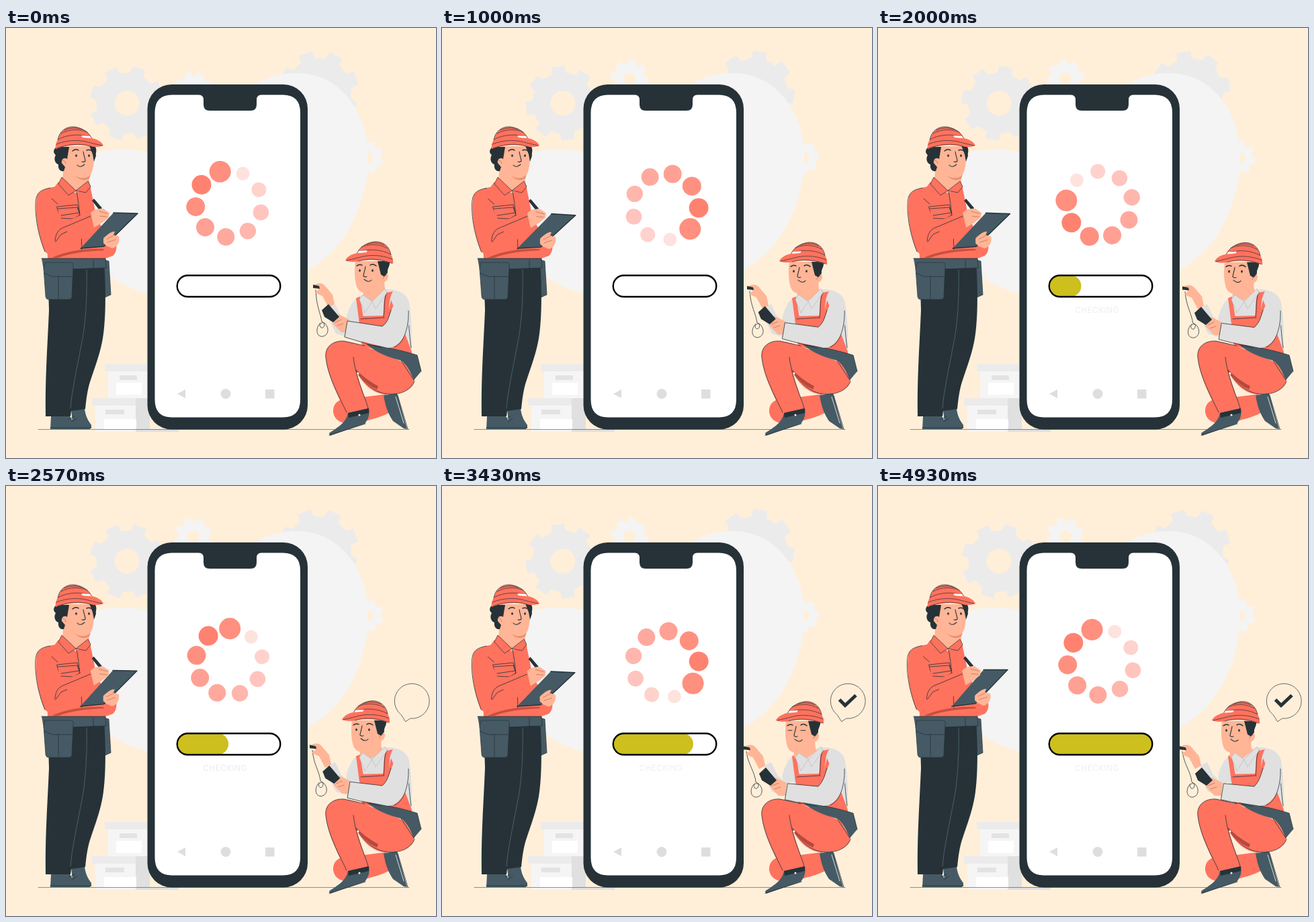
Write an HTML page that moves like this. It is 640 px wide and 640 px high and loops after 5000 ms.

```html
<!DOCTYPE html>
<html lang="en">
<head>
<meta charset="utf-8">
<title>Device check</title>
<style>
html, body { margin: 0; width: 100%; height: 100%; overflow: hidden; background: #ffefd9; }
svg { display: block; width: 100%; height: 100%; }
.coral { fill: #ff725e; }
.skin { fill: #ffb596; }
.dark { fill: #263238; }
.slate { fill: #455a64; }
.shirt { fill: #e0e0e0; }
.line { fill: none; stroke: #263238; stroke-width: .8; stroke-linecap: round; stroke-linejoin: round; }
.edge { stroke: #263238; stroke-width: .7; stroke-linejoin: round; }
.crease { fill: none; stroke: #b76850; stroke-width: .7; stroke-linecap: round; }
text { font: 400 11.5px Inter, "Open Sans", sans-serif; letter-spacing: .6px; fill: #333; }
#dots { letter-spacing: -.6px; }
</style>
</head>
<body>
<svg viewBox="0 0 640 640">
  <defs>
    <g id="face">
      <path class="skin" d="M88 176H130C132 190 131 205 128 214C124 226 107 226 99 216L90 206Z"/>
      <path class="skin" d="M92 194C87 190 81 192 81 199C82 206 88 209 93 206Z"/>
      <path class="crease" d="M84 197Q88 197 89 202"/>
      <path class="line" style="stroke-width:1.1" d="M115 184C116 191 118 195 118 198Q116 200 113 199M106 204Q110 209 117 203"/>
      <path class="line" style="stroke-width:1.5" d="M99 183Q104 179 108 182M120 182Q124 180 128 183"/>
    </g>
    <g id="cap">
      <path class="coral edge" d="M77 167C79 153 90 146 102 147C115 149 125 156 128 166L110 168Z"/>
      <path class="coral" d="M74 180C73 173 76 166 80 164C95 158 113 158 128 164C137 166 143 170 145 175C138 178 130 177 125 176C108 172 90 174 74 180Z"/>
      <path class="line" style="stroke-width:.7" d="M77 166C92 158 111 157 127 163M75 173C92 166 111 166 126 171L143 175M82 157C94 150 110 150 121 155M87 152C95 148 106 148 113 151M76 179C92 173 109 171 126 176"/>
      <path fill="#fff" d="M112 160L125 161L127 164L114 163Z"/>
    </g>
    <clipPath id="pill"><rect x="255" y="368" width="153" height="32" rx="16"/></clipPath>
  </defs>

  <!-- backdrop -->
  <g id="gears" fill-rule="evenodd"></g>
  <path fill="#f4f4f4" d="M432 67C498 67 539 126 539 192C539 260 505 331 448 360L340 350V110C365 82 397 67 432 67Z"/>
  <path fill="#f4f4f4" d="M214 185C180 178 140 180 120 192C90 230 110 330 150 367C172 383 195 392 214 396Z"/>
  <path fill="#f5f5f5" d="M152 510H214V552H152ZM133 561H194V601H133Z"/>
  <path fill="#ebebeb" d="M147 500H214V511H147ZM128 551H196V562H128Z"/>
  <path fill="#e0e0e0" d="M193 551H214V597H257V601H193Z"/>
  <path fill="#e3e3e3" d="M169 517H195V524H169ZM148 568H176V575H148Z"/>
  <path fill="#fff" d="M164 528H202V546H164ZM146 582H194V597H146Z"/>
  <path class="line" style="stroke-opacity:.65" d="M48 597.500H600"/>

  <!-- phone -->
  <rect class="dark" x="210.500" y="84" width="238.500" height="513.500" rx="36"/>
  <path fill="#fff" d="M247 99.500H287Q294 99.500 294 107V114Q294 123 303 123H364Q373 123 373 114V107Q373 99.500 380 99.500H412Q438 99.500 438 126V553Q438 579.500 412 579.500H247Q221.500 579.500 221.500 553V126Q221.500 99.500 247 99.500Z"/>
  <path fill="#dedede" d="M255 544.500L267 538V551ZM387 538H398.500Q399.500 538 399.500 539V550.500Q399.500 551.500 398.500 551.500H387Q386 551.500 386 550.500V539Q386 538 387 538Z"/>
  <circle fill="#dedede" cx="327" cy="544.500" r="7.500"/>
  <g id="spin"></g>
  <g clip-path="url(#pill)"><rect id="fill" fill="#ccbf1e" x="255" y="368" width="0" height="32" rx="16" ry="16"/></g>
  <rect fill="none" stroke="#000" stroke-width="2.400" x="254.700" y="368.200" width="153.600" height="31.800" rx="15.900"/>
  <text id="label" x="293.500" y="424">CHECKING<tspan id="dots"></tspan></text>

  <!-- standing worker -->
  <path class="slate edge" d="M146 345L153 347L156 397L147 401Z"/>
  <path class="slate" d="M97 568L117 566C118 577 122 584 127 591V596H100Z"/>
  <path class="dark" d="M62 355H146.500C149 400 148 438 144 462C139 490 130 510 124 530C120 545 119 558 118 567L97 570L96 578H59C58 520 62 470 64 420Z"/>
  <path class="line" style="stroke:#566b75" d="M120 360C121 405 118 445 112 472C105 510 98 540 96 566"/>
  <path class="slate" d="M67 578H95C99 586 106 590 113 591L125 595V597H66Z"/>
  <path class="line" d="M66 595H126M94 582L102 578M98 586L105 581"/>
  <path class="skin" d="M86 204L126 214C122 222 124 232 127 240L104 246L84 225Z"/>
  <path fill="#e99170" d="M101 217C108 224 118 225 126 218L124 224C115 229 106 225 101 217Z"/>
  <path class="coral" d="M78 229L104 246L125 234C128 250 132 264 134 282L152 312L163 318C166 326 164 335 159 339L148 343H62L58 256Z"/>
  <path class="coral edge" d="M83 222L78 232L93 249L104 242ZM122 228L126 236L119 245L104 242Z"/>
  <path class="line" d="M105 243C110 270 112 300 113 330M76 266L106 263L110 278L101 284L80 283ZM77 269L106 267L109 275L82 279"/>
  <path fill="#c94f3e" d="M68 342C90 332 118 328 145 329L146 331C120 332 95 335 78 342Z"/>
  <g id="sleeve">
    <path class="coral" d="M74 236C60 239 49 241 46 251C42 275 48 309 57 331C63 341 77 339 87 334L132 298L127 272L85 290L73 264Z"/>
    <path class="line" d="M66 238C48 241 45 248 44 260C43 287 50 313 58 333M73 317C74 304 79 299 88 296L126 280M68 254L77 262M74 318L82 307L91 303"/>
  </g>
  <g id="board">
    <path class="slate" d="M160 275L196 276L146 325L111 328Z"/>
    <path class="line" style="stroke-width:1.400" d="M160 275L196 276L146 325L111 328"/>
  </g>
  <g id="holder">
    <path class="skin" d="M145 313C150 308 157 302 162 303L160 308L168 310C170 318 166 326 158 328L149 324L145 320Z"/>
    <path class="crease" d="M150 314L160 309M151 319L163 315"/>
  </g>
  <g id="writer">
    <path class="dark" d="M128 257L131 254L143 268L139 271Z"/>
    <path class="skin" d="M126 275C131 270 138 268 145 269L154 275L153 282L143 290L131 297Z"/>
    <path class="crease" d="M139 273L151 276M140 280L150 281"/>
  </g>
  <path class="slate" d="M53 343H148L149 357L56 360Z"/>
  <path class="line" d="M53 343H148L149 357L100 359"/>
  <path class="slate edge" d="M58 349H97Q101 349 100 356L98 400Q98 404 93 404H64Q59 404 59 399L56 358Z"/>
  <path class="line" d="M57 365L69 370H99M78 370V403M130 345V358"/>
  <use href="#face"/>
  <path class="dark" d="M75 177C70 181 70 186 74 189C70 196 74 202 78 203C77 210 81 214 86 213L88 207L83 201C82 195 87 192 91 195L94 177ZM124 175L133 177C136 182 133 186 134 190L131 199L129 188Z"/>
  <path id="eyesL" class="line"/>
  <use href="#cap"/>

  <!-- kneeling worker -->
  <path class="coral" d="M487 572C486 557 497 551 510 552L566 545L572 572C556 580 542 583 530 586C510 591 490 590 487 572Z"/>
  <path class="slate" d="M562 547L582 543C587 562 592 580 597 597L592 596L576 585C569 574 565 565 562 547Z"/>
  <path class="line" style="stroke:#fff" d="M580 549L592 588"/>
  <path class="line" d="M583 547L598 597"/>
  <path class="shirt" d="M526 399L566 389C583 388 598 396 600 409C604 432 605 462 603 483L560 477L522 466L522 440L510 446L506 432C510 417 516 404 526 399Z"/>
  <path class="shirt" d="M480 416L490 411L499 430L510 440L507 460L491 455L480 432Z"/>
  <path class="coral" d="M525 429L568 428L573 405L592 450L604 482L604 488L530 474Z"/>
  <path class="coral" d="M521 402L527 400L532 432L526 440ZM566 394L576 392C568 404 572 420 567 436L561 432C563 418 561 402 566 394Z"/>
  <path class="line" d="M528 433L563 431M567 394C562 402 564 416 562 430M597 420C600 440 600 455 603 476"/>
  <path class="coral" d="M476 491C474 475 486 465 503 466C530 470 571 488 594 499L608 524C606 539 586 546 566 545C548 545 533 532 522 513C527 532 535 550 539 567L506 573C492 543 479 518 476 491Z"/>
  <path class="line" d="M507 572C494 545 479 518 476 491C474 475 486 465 503 466L534 473M517 490C521 523 535 550 539 566M521 509C532 528 548 543 569 545C588 546 603 539 608 526"/>
  <path fill="#b5493c" d="M521 508C528 516 540 526 554 533L552 538C539 532 530 523 521 508Z"/>
  <path class="slate" d="M537 471C562 474 590 480 612 487L618 511L607 524C601 510 596 500 588 495C570 490 552 484 537 471Z"/>
  <path class="line" d="M537 471C562 474 590 480 612 487L618 511M588 495L607 524"/>
  <path class="slate" d="M509 573L540 566C542 575 539 583 534 589L482 607L481 603C494 594 506 588 509 573Z"/>
  <path class="dark" d="M509 573L540 566L540 573L510 580Z"/>
  <path class="line" d="M481 606L535 589"/>
  <circle cx="526" cy="576" r="1.500" fill="#fff"/><circle cx="524" cy="514" r="1.500" fill="#fff"/>
  <path id="cord" class="line"/>
  <g id="reach">
    <path class="skin" d="M458 383C464 379 471 379 475 384L486 397L489 411L480 416L471 399L460 394L466 389Z"/>
    <path class="dark" d="M457 382L466 384L467 388L457 387Z"/>
  </g>
  <g id="meter">
    <path class="skin" d="M484 433L495 426L511 434L509 453L499 453L487 441Z"/>
    <path class="dark" d="M470 420L480 411L496 430L487 438L474 430Z"/>
    <path class="crease" d="M490 438L499 434M493 443L502 440"/>
  </g>
  <path id="forearm" class="shirt"/>
  <path id="forearmLine" class="line"/>
  <g id="head">
    <path class="skin" d="M531 383L564 372C563 382 563 387 566 391L545 407L532 401Z"/>
    <g transform="translate(650 171) scale(-1 1)">
      <use href="#face"/>
      <path class="dark" d="M79 176C78 184 83 187 82 193L87 199L92 196L97 176Z"/>
      <path id="eyesR" class="line"/>
      <use href="#cap"/>
    </g>
  </g>
  <path class="shirt edge" style="stroke:#bbb" d="M531 397L526 404L534 424L545 407ZM564 388L567 394L550 418L545 407Z"/>

  <g id="bubble">
    <path class="line" style="stroke-width:.7" d="M588 340.500A26 26 0 1 1 601.500 346L595 350.500Z"/>
    <path id="check" fill="none" stroke="#263238" stroke-width="5" d="M591.500 318L600 326.500L616 311.500"/>
  </g>
</svg>
<script>
const $ = id => document.getElementById(id);
const SPAN = 5000, FRAMES = 70, STEP = SPAN / FRAMES;

function add(parent, tag, attrs) {
  const el = document.createElementNS('http://www.w3.org/2000/svg', tag);
  for (const k in attrs) el.setAttribute(k, attrs[k]);
  return parent.appendChild(el);
}
const set = (id, k, v) => $(id).setAttribute(k, v);
const move = (id, x, y) => set(id, 'transform', `translate(${x} ${y})`);
const show = (id, on) => set(id, 'visibility', on ? 'visible' : 'hidden');

// Linear interpolation through [time, value] pairs
function at(keys, t) {
  if (t <= keys[0][0]) return keys[0][1];
  for (let i = 1; i < keys.length; i++) {
    const [a, u] = keys[i - 1], [b, v] = keys[i];
    if (t <= b) return u + (v - u) * (t - a) / (b - a);
  }
  return keys[keys.length - 1][1];
}

function gearPath(r, hole, teeth) {
  const pts = [], pitch = 2 * Math.PI / teeth;
  for (let i = 0; i < teeth; i++)
    for (const [f, k] of [[-.29, .82], [-.22, 1], [.22, 1], [.29, .82]]) {
      const a = (i + f) * pitch - Math.PI / 2;
      pts.push(`${(Math.cos(a) * k * r).toFixed(2)} ${(Math.sin(a) * k * r).toFixed(2)}`);
    }
  return `M${pts.join('L')}ZM${hole} 0A${hole} ${hole} 0 1 0 ${-hole} 0A${hole} ${hole} 0 1 0 ${hole} 0Z`;
}

const gears = [
  { x: 180, y: 112, r: 56, hole: 18.5, dir: 1, fill: '#ebebeb' },
  { x: 465, y: 94, r: 60, hole: 20, dir: -1, fill: '#ebebeb' },
  { x: 279, y: 75, r: 28, hole: 9, dir: -1, fill: '#f4f4f4' },
  { x: 537, y: 193, r: 25, hole: 9.5, dir: 1, fill: '#f4f4f4' }
];
for (const g of gears) g.el = add($('gears'), 'path', { d: gearPath(g.r, g.hole, 8), fill: g.fill });

// Nine dots trailing the largest one, ring slightly off its pivot
const sizes = [16, 14.5, 14, 13.5, 13, 12.2, 11.8, 11, 10];
const tints = ['#ff8f7f', '#ff8270', '#ff9080', '#ffa094', '#ffa99e', '#ffb6ad', '#ffc4bd', '#ffd2cc', '#fee2de'];
sizes.forEach((r, i) => {
  const a = -i * 40 * Math.PI / 180, tilt = 16 * Math.PI / 180;
  add($('spin'), 'circle', {
    cx: 49.5 * Math.cos(a) + 2.2 * Math.cos(tilt),
    cy: 49.5 * Math.sin(a) + 2.2 * Math.sin(tilt),
    r, fill: tints[i]
  });
});

const turn = [[0, -105], [570, -19], [1430, 103.6], [2570, 271], [3430, 395], [4210, 510], [4930, 615]];
const bar = [[1050, 0], [1430, 19], [2570, 76], [3430, 119], [4210, 150], [4500, 153]];
const sway = [[0, 0], [570, 4], [1430, 2], [2570, -1], [3430, 2], [4210, 5], [4930, -3]];
const lean = [[0, 0], [570, 3], [1430, 3], [2570, 5], [3430, 8]];
const pulse = [[0, .08], [.44, .1], [.52, .5], [.62, .85], [.85, .85], [1, .08]];

const OPEN = 'M104.500 189.500v1M123.500 189.500v1', SHUT = 'M101 190h7M121 190h6';
function eyes(id, shut) {
  set(id, 'd', shut ? SHUT : OPEN);
  set(id, 'style', `stroke-width:${shut ? 1 : 2.6}`);
}
const near = (t, ...times) => times.some(m => Math.abs(t - m) < 75);

function draw(t) {
  gears.forEach((g, i) => {
    const rise = i === 2 ? Math.max(0, 18 * (1 - t / 400)) : 0;
    const a = g.dir * (t - 1430) * 90 / 4930;
    g.el.setAttribute('transform', `translate(${g.x} ${g.y + rise}) rotate(${a})`);
  });
  set('spin', 'transform', `translate(331.5 263.8) rotate(${at(turn, t)})`);
  set('fill', 'width', at(bar, t));

  const phase = (t + 1080) % 1500 / 1500;
  show('label', t >= 1050);
  set('label', 'opacity', at(pulse, phase));
  $('dots').textContent = '.'.repeat([.57, .61, .65].filter(p => phase >= p).length);

  const s = at(sway, t);
  set('board', 'transform', `translate(${s * .4} 0) rotate(${s * .6} 111 327)`);
  move('holder', s * .3, s * .3);
  move('writer', s * .3, s * .2);
  move('sleeve', s * .2, s * .1);
  eyes('eyesL', near(t, 570, 1430));
  eyes('eyesR', near(t, 3430));

  const v = at(lean, t);
  move('head', -v, v * .35);
  move('reach', -v, v * .65);
  move('meter', v * .25, v);
  const x = 508 + v * .8, y = 436 + v * .85;
  const d = `M${x} ${y}L560 ${444 + v * .4}C571 437 571 421 580 407L600 409L603 440C600 460 585 477 568 476L${x - 4} ${y + 24}`;
  set('forearm', 'd', `M${x} ${y}L560 ${444 + v * .4}C571 437 571 421 580 407L599 409L601 436C597 458 583 477 568 476L${x - 4} ${y + 24}Z`);
  set('forearmLine', 'd', `M558 ${476 + v * .1}L${x - 4} ${y + 24}L${x} ${y}L560 ${444 + v * .4}C569 438 570 428 573 420M599 421C600 445 592 470 578 475`);
  const cx = 471 - v * .35, cy = 449 + v * .5;
  set('cord', 'd', `M${461 - v} ${390 + v * .65}C${462 - v * .8} 415 ${cx - 3} 424 ${cx - 1} ${cy - 12}C${cx + 5} ${cy - 11} ${cx + 3} ${cy - 1} ${cx - 2} ${cy - 3}C${cx - 7} ${cy - 7} ${cx - 1} ${cy - 13} ${cx + 4} ${cy - 9}C${cx + 12} ${cy} ${cx + 7} ${cy + 11} ${cx - 2} ${cy + 10}C${cx - 11} ${cy + 8} ${cx - 9} ${cy - 5} ${cx - 3} ${cy - 10}`);

  show('bubble', t >= 2430);
  show('check', t >= 2720);
}

const start = performance.now();
function tick(now) {
  const t = Math.max(0, now - start) % SPAN;
  draw(Math.floor((t + 5) / STEP) % FRAMES * STEP);
  requestAnimationFrame(tick);
}
draw(0);
requestAnimationFrame(tick);
</script>
</body>
</html>
```
